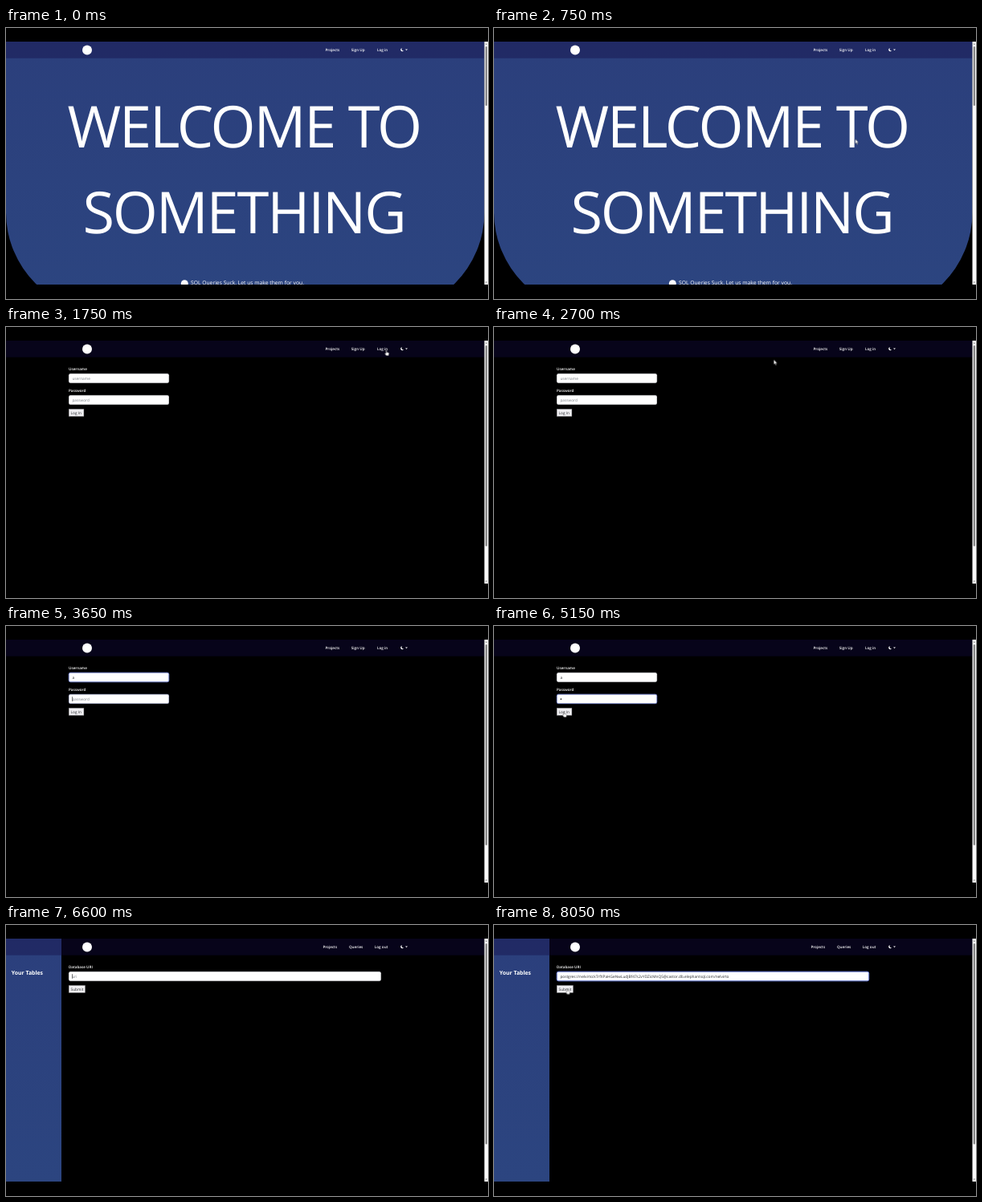
An HTML page that plays this animation: 600x338 px, repeating every 8.15 s.

```html
<!DOCTYPE html>
<html lang="en">
<head>
<meta charset="utf-8">
<title>Login walkthrough</title>
<style>
html, body { margin: 0; width: 100%; height: 100%; overflow: hidden; background: #000; }
svg { display: block; width: 600px; height: 338px; }
text { font: 4.75px "Open Sans", sans-serif; fill: #fff; text-rendering: geometricPrecision; }
.nav text, .label { font-size: 4.6px; font-weight: 600; }
.hero { font-size: 72px; letter-spacing: -.03em; }
.tagline { font-size: 6.75px; }
.side { font-size: 6.9px; font-weight: 700; }
.hint { fill: #7b8087; }
.ink { fill: #26282c; }
.field { fill: #fff; stroke: #d4d6e0; stroke-width: .3; }
.button { fill: #f0eff2; stroke: #8a8a90; stroke-width: .4; }
.glow { fill: none; stroke: #5c70d6; stroke-width: .9; opacity: 0; }
.caret { fill: #111; }

/* One shared loop; .cut switches hard, the rest eases. */
.cut, .ease { animation: 8150ms infinite; }
.cut { animation-timing-function: step-end; opacity: 0; }
.ease { animation-timing-function: ease-in-out; }

#home { animation-name: home; }
#login { animation-name: login; }
#tables { animation-name: tables; }
#userHint { animation-name: userHint; }
#userText { animation-name: userText; }
#userCaret { animation-name: userCaret; }
#passHint { animation-name: passHint; }
#passText { animation-name: passText; }
#passCaret { animation-name: passCaret; }
#uriHint { animation-name: uriHint; }
#uriText { animation-name: uriText; }
#uriCaret { animation-name: uriCaret; }
#userGlow { animation-name: userGlow; }
#passGlow { animation-name: passGlow; }
#uriGlow { animation-name: uriGlow; }
#pointer { animation-name: move; }
#arrow { animation-name: arrow; }
#hand { animation-name: hand; }
#beam { animation-name: beam; }

@keyframes home { 0% { opacity: 1 } 21.472%, 100% { opacity: 0 } }
@keyframes login { 0% { opacity: 0 } 21.472% { opacity: 1 } 64.417%, 100% { opacity: 0 } }
@keyframes tables { 0% { opacity: 0 } 64.417%, 100% { opacity: 1 } }
@keyframes userHint { 0% { opacity: 1 } 41.104%, 100% { opacity: 0 } }
@keyframes userText { 0% { opacity: 0 } 41.104%, 100% { opacity: 1 } }
@keyframes userCaret { 0% { opacity: 0 } 37.423% { opacity: 1 } 41.104%, 100% { opacity: 0 } }
@keyframes passHint { 0% { opacity: 1 } 48.466%, 100% { opacity: 0 } }
@keyframes passText { 0% { opacity: 0 } 48.466%, 100% { opacity: 1 } }
@keyframes passCaret { 0% { opacity: 0 } 44.171% { opacity: 1 } 48.466%, 100% { opacity: 0 } }
@keyframes uriHint { 0% { opacity: 1 } 84.662%, 100% { opacity: 0 } }
@keyframes uriText { 0% { opacity: 0 } 84.662%, 100% { opacity: 1 } }
@keyframes uriCaret { 0% { opacity: 0 } 80.981% { opacity: 1 } 84.662%, 100% { opacity: 0 } }
@keyframes userGlow { 0%, 37.423% { opacity: 0 } 39.264%, 44.171% { opacity: 1 } 46.012%, 100% { opacity: 0 } }
@keyframes passGlow { 0%, 44.171% { opacity: 0 } 46.012%, 62.5% { opacity: 1 } 64.417%, 100% { opacity: 0 } }
@keyframes uriGlow { 0%, 80.981% { opacity: 0 } 82.822%, 100% { opacity: 1 } }

@keyframes move {
  0%, 4.294% { transform: translate(410px, 320px) }
  12.883%, 30.675% { transform: translate(473.5px, 29px) }
  36.81%, 53.988% { transform: translate(100px, 64px) }
  58.896%, 72.393% { transform: translate(87.2px, 107px) }
  76.074% { transform: translate(98px, 142px) }
  79.141%, 92.025% { transform: translate(82.6px, 64px) }
  96.933%, 100% { transform: translate(91.3px, 79.6px) }
}
@keyframes arrow {
  0% { opacity: 0 } 4.294% { opacity: 1 } 12.27% { opacity: 0 }
  30.675% { opacity: 1 } 36.196% { opacity: 0 }
  55.6% { opacity: 1 } 57.669% { opacity: 0 }
  64.417% { opacity: 1 } 78.528%, 100% { opacity: 0 }
}
@keyframes hand {
  0% { opacity: 0 } 12.27% { opacity: 1 } 30.675% { opacity: 0 }
  57.669% { opacity: 1 } 64.417% { opacity: 0 } 95.092%, 100% { opacity: 1 }
}
@keyframes beam {
  0% { opacity: 0 } 36.196% { opacity: 1 } 41.104% { opacity: 0 }
  53.988% { opacity: 1 } 55.6% { opacity: 0 }
  78.528% { opacity: 1 } 80.981% { opacity: 0 }
  92.025% { opacity: 1 } 95.092%, 100% { opacity: 0 }
}
</style>
</head>
<body>
<svg viewBox="0 0 600 338">
  <defs>
    <clipPath id="view"><rect y="17" width="600" height="303"/></clipPath>
    <linearGradient id="blue" x1="0" y1="0" x2="0" y2="1">
      <stop stop-color="#2b3f7c"/><stop offset="1" stop-color="#2c4580"/>
    </linearGradient>
    <g id="bar">
      <rect y="17" width="595.5" height="20.7" fill="#120a41" fill-opacity=".4"/>
      <circle cx="101" cy="27.5" r="6" fill="#fff"/>
      <path d="M492.7 25.1a2.1 2.1 0 1 0 2.3 3.2a2.2 2.2 0 0 1-2.3-3.2zM497 26.5h3l-1.5 1.5z" fill="#fff"/>
    </g>
    <g id="track">
      <rect x="595.5" y="17" width="4.5" height="303" fill="#fafafa"/>
      <path d="M596.6 20.8h2.4l-1.2-1.7zM596.6 316.6h2.4l-1.2 1.7z" fill="#858585"/>
    </g>
  </defs>

  <rect width="600" height="338"/>
  <g clip-path="url(#view)">
    <g id="home" class="cut">
      <path d="M0 17H595.5V230A125 125 0 0 1 470.5 355H125A125 125 0 0 1 0 230z" fill="url(#blue)"/>
      <use href="#bar"/>
      <g class="nav">
        <text x="397.5" y="29.2">Projects</text>
        <text x="429.8" y="29.2">Sign Up</text>
        <text x="462" y="29.2">Log in</text>
      </g>
      <text class="hero" x="76.5" y="148.8">WELCOME TO</text>
      <text class="hero" x="95.5" y="256.3">SOMETHING</text>
      <circle cx="222.3" cy="318.8" r="4.5" fill="#fff"/>
      <text class="tagline" x="230" y="320">SQL Queries Suck. Let us make them for you.</text>
      <use href="#track"/>
      <rect x="596.7" y="23" width="2.3" height="74" rx="1.1" fill="#858585"/>
    </g>

    <g id="login" class="cut">
      <rect y="17" width="600" height="303"/>
      <use href="#bar"/>
      <g class="nav">
        <text x="397.5" y="29.2">Projects</text>
        <text x="429.8" y="29.2">Sign Up</text>
        <text x="462" y="29.2">Log in</text>
      </g>
      <text class="label" x="78" y="53.7">Username</text>
      <rect class="field" x="78.2" y="58.2" width="124.6" height="11.6" rx="2"/>
      <rect id="userGlow" class="glow ease" x="78.2" y="58.2" width="124.6" height="11.6" rx="2"/>
      <text id="userHint" class="hint cut" x="82.4" y="65.8">username</text>
      <text id="userText" class="ink cut" x="82.4" y="65.8">a</text>
      <rect id="userCaret" class="caret cut" x="82" y="61.2" width=".6" height="5.6"/>
      <text class="label" x="78" y="80.7">Password</text>
      <rect class="field" x="78.2" y="85.2" width="124.6" height="11.6" rx="2"/>
      <rect id="passGlow" class="glow ease" x="78.2" y="85.2" width="124.6" height="11.6" rx="2"/>
      <text id="passHint" class="hint cut" x="82.4" y="92.8">password</text>
      <circle id="passText" class="ink cut" cx="83.4" cy="91.2" r=".85"/>
      <rect id="passCaret" class="caret cut" x="82" y="88.2" width=".6" height="5.6"/>
      <rect class="button" x="78.2" y="102.4" width="18.7" height="9"/>
      <text class="ink" x="80.6" y="108.7">Log In</text>
      <use href="#track"/>
      <rect x="596.7" y="23" width="2.3" height="250.5" rx="1.1" fill="#858585"/>
    </g>

    <g id="tables" class="cut">
      <rect y="17" width="600" height="303"/>
      <rect y="17" width="69" height="303" fill="url(#blue)"/>
      <use href="#bar"/>
      <g class="nav">
        <text x="394.4" y="29.2">Projects</text>
        <text x="427" y="29.2">Queries</text>
        <text x="458.8" y="29.2">Log out</text>
      </g>
      <text class="side" x="6.8" y="61.7">Your Tables</text>
      <text class="label" x="78" y="53.7">Database URI</text>
      <rect class="field" x="78.2" y="58.2" width="388.5" height="11.6" rx="2"/>
      <rect id="uriGlow" class="glow ease" x="78.2" y="58.2" width="388.5" height="11.6" rx="2"/>
      <text id="uriHint" class="hint cut" x="82.4" y="65.8">uri</text>
      <text id="uriText" class="ink cut" x="82.4" y="65.8">postgres://nelvirto:kTrfXPaHGeNwLudJBf47s2vYDZicMnQ5@castor.db.elephantsql.com/nelvirto</text>
      <rect id="uriCaret" class="caret cut" x="82" y="61.2" width=".6" height="5.6"/>
      <rect class="button" x="78.2" y="75.4" width="20.3" height="9"/>
      <text class="ink" x="80.6" y="81.7">Submit</text>
      <use href="#track"/>
      <rect x="596.7" y="23" width="2.3" height="250.5" rx="1.1" fill="#858585"/>
    </g>

    <g id="pointer" class="ease">
      <path id="arrow" class="cut" d="M0 0v6l1.4-1.3 1 2.2.9-.4-1-2.1h1.9z" fill="#fff" stroke="#000" stroke-width=".3"/>
      <path id="hand" class="cut" d="M-.6 0q.6-.7 1.2 0v2.6l2 .5q.7.2.6 1l-.4 2.6h-3l-1.8-2.6q.2-.9 1.4 0z" fill="#fff" stroke="#000" stroke-width=".3"/>
      <path id="beam" class="cut" d="M-1-3h2M0-3v6M-1 3h2" fill="none" stroke="#111" stroke-width=".5"/>
    </g>
  </g>
</svg>
</body>
</html>
```
